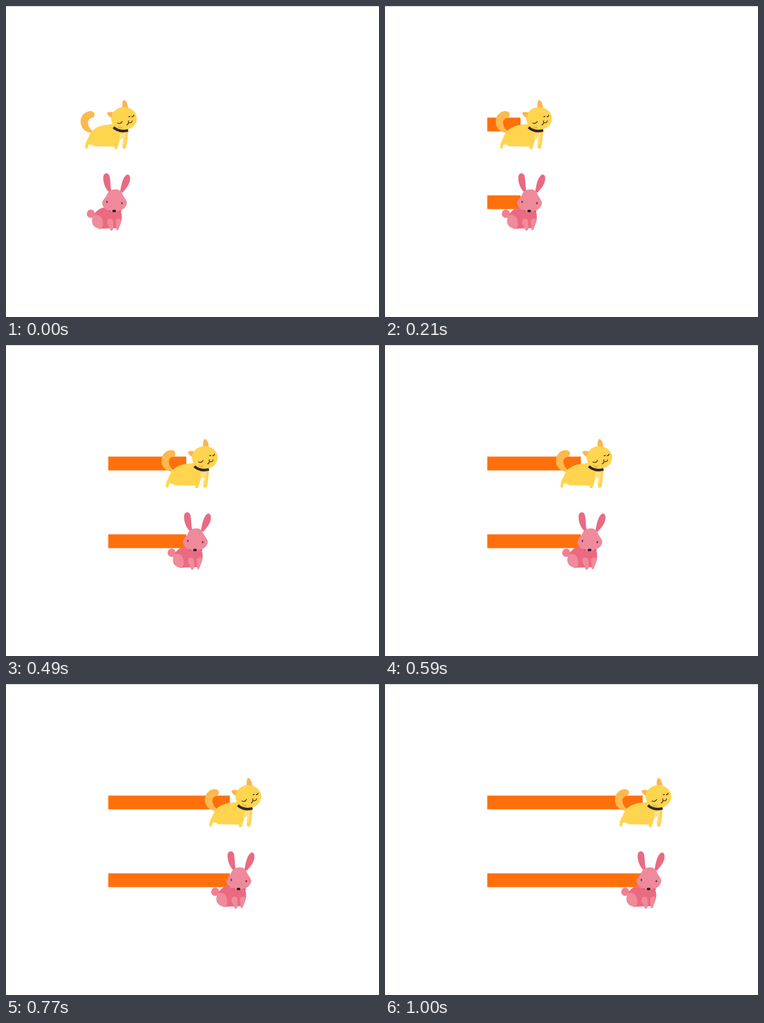
These frames come from a looping animation (600 px wide and 500 px high, 3.82 s). An HTML page:

```html
<!DOCTYPE html>
<html lang="en">
<head>
<meta charset="utf-8">
<title>Cat and rabbit race</title>
<style>
  html, body { margin: 0; width: 100%; height: 100%; overflow: hidden; background: #fff; }
  svg { display: block; width: 600px; height: 500px; }
  .ink { fill: none; stroke: #4a3a26; stroke-width: 1.3; stroke-linecap: round; }
</style>
</head>
<body>
<svg viewBox="0 0 600 500">
  <rect width="600" height="1" fill="#c6cece"/>
  <g fill="#ff700c">
    <rect class="bar" x="164.5" y="179.4" height="22.2"/>
    <rect class="bar" x="164.5" y="304.4" height="22.2"/>
  </g>

  <g class="runner" id="cat">
    <path fill="#fcb94d" d="M137 204C126 203 119 195 119.500 185C120 175 128 168.500 136 169C142 169.500 144 175 140 179C135 180 131 183 131.500 188C132 195 136 200 142 202Z"/>
    <path fill="#ffd44f" d="M127 229C126 221 130 216 133 209C137 198 148 192 162 191L176 189L196 199C195.500 210 194.500 220 192.500 228Q190 231 187 228L188 212L183 215L179 228Q177 232 174 229L174 226L141 225.500Q136 221 132 223L131 228Q129 230 127 229Z"/>
    <path fill="#fde08a" d="M183 205L192 204L190 222L186 224L188 212L182 215Z"/>
    <path fill="#fbb452" d="M187 165C186 158 187 152 189 151C193 152 195 157 196 164ZM172 171Q164 169 162 172Q164 178 170 180Z"/>
    <ellipse cx="189.300" cy="181" rx="20.700" ry="18.500" fill="#ffd44f"/>
    <path d="M172.500 195Q181 203.500 196 200" fill="none" stroke="#302832" stroke-width="4.200"/>
    <path d="M180 193L183 197M184 194L186 197" stroke="#f7a13c" stroke-width="1.500"/>
    <path class="ink" d="M179 188Q184 190.500 186.500 185.500M197 178L199 177.500M202 178Q204.500 178 205 175.500M196.500 184.500V188Q196 190.500 194 191M197 187.500Q202 188.500 202.500 184.500"/>
  </g>

  <g class="runner" id="rabbit">
    <ellipse cx="136" cy="334" rx="6.500" ry="6.800" fill="#f08093"/>
    <path fill="#ea6b81" d="M156 324C145 327 138 336 138 346C138 354 145 358 153 358L180 357C186 348 188 337 183 328Z"/>
    <path fill="#f08b9b" d="M139 337Q149 333 154 342Q158 355 151 359Q140 355 138 347Z"/>
    <path fill="#f08b9b" d="M163 343Q171 339 172 348L172 359Q169 363 167 360Q166 354 162 350ZM176 344Q184 338 185 346Q183 353 180 360Q176 362 177 356Z"/>
    <path fill="#e96a83" d="M166 300C160 295 155 284 156 274C157 268 164 267 166 273C168 281 167 290 169 298Z"/>
    <path fill="#e96a83" d="M183 299C185 288 187 275 194 271C200 270 200 278 198 284C195 292 190 296 187 300Z"/>
    <path fill="#ee8a9b" d="M174 295C180 294 185 297 187 303C189 308 194 312 194 317C193 325 184 331 174 331C164 331 155 325 154 317C155 311 160 308 162 303C164 298 168 295 174 295Z"/>
    <ellipse cx="162" cy="315" rx="1.200" ry="1.800" fill="#493044"/>
    <ellipse cx="186" cy="317" rx="1.200" ry="1.800" fill="#493044"/>
    <path fill="#e04d70" d="M163 328L168 329L166 331ZM179 329L186 329L184 331Z"/>
    <ellipse cx="173.500" cy="329.500" rx="3" ry="2" fill="#252026"/>
  </g>
</svg>

<script>
const LOOP = 3820;
const DISTANCE = 250;
const BAR_LAG = 4.5;
const RUNNER_X = 0.5;
const STEPS = [0, 30, 70, 120, 160, 210, 260, 300, 350, 390, 440, 490,
               540, 590, 630, 670, 720, 760, 810, 860, 900, 970, 1000];
// Time in ms and distance run, joined by straight lines.
const PACE = [[30, 12], [210, 58], [390, 104], [490, 130], [670, 175], [900, 238], [970, DISTANCE]];

const runners = document.querySelectorAll('.runner');
const bars = document.querySelectorAll('.bar');

function distanceAt(time) {
  if (time < PACE[0][0]) return 0;
  const next = PACE.findIndex(([t]) => t > time);
  if (next < 0) return DISTANCE;
  const [t0, d0] = PACE[next - 1];
  const [t1, d1] = PACE[next];
  return d0 + (d1 - d0) * (time - t0) / (t1 - t0);
}

function draw(now) {
  const time = now % LOOP;
  const step = STEPS.filter(t => t <= time).pop();
  const distance = Math.round(distanceAt(step));
  const width = step >= 1000 ? DISTANCE : Math.max(0, distance - BAR_LAG);
  runners.forEach(runner => runner.setAttribute('transform', `translate(${distance + RUNNER_X})`));
  bars.forEach(bar => bar.setAttribute('width', width));
}

const start = performance.now();
function tick() {
  draw(performance.now() - start);
  requestAnimationFrame(tick);
}
tick();
</script>
</body>
</html>
```
